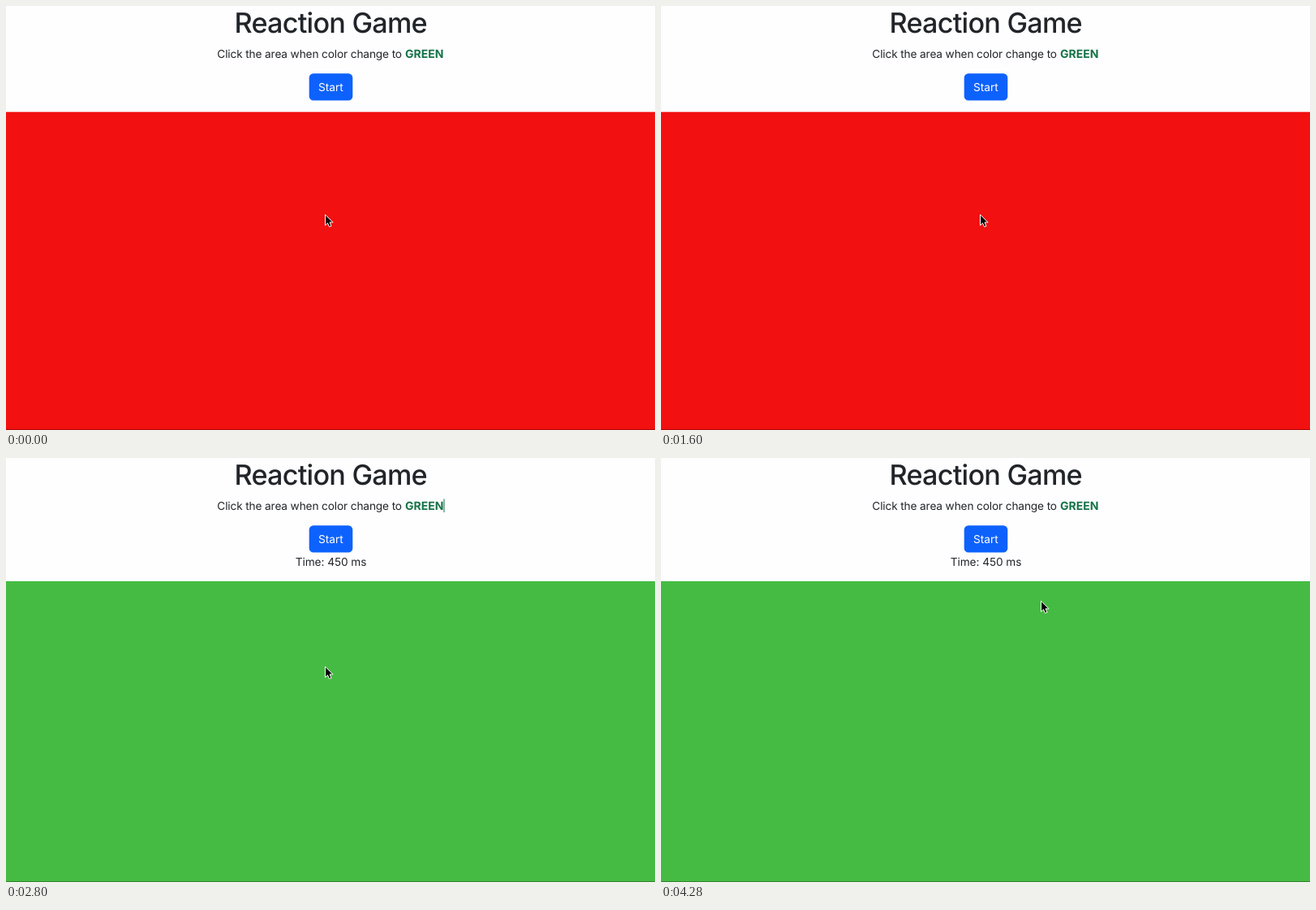
Animation, 800 px wide and 523 px high, one loop 4320 ms. Source, as an HTML page:

```html
<!DOCTYPE html>
<html lang="en">
<head>
<meta charset="utf-8">
<title>Reaction Game</title>
<style>
  html, body { margin: 0; width: 100%; height: 100%; overflow: hidden; background: #fefdff; }
  svg { display: block; width: 800px; height: 523px; }
  text {
    font: 400 13.65px Inter, "Liberation Sans", sans-serif;
    font-optical-sizing: none;
    text-rendering: geometricPrecision;
    fill: #212529;
  }
  .mid { text-anchor: middle; }
  .title { font-size: 34.2px; font-weight: 500; letter-spacing: -.022em; }
  .hint { letter-spacing: -.009em; }
  .go { font-size: 14px; font-weight: 700; fill: #157347; }
  .label { fill: #fff; }
  .time { letter-spacing: -.004em; }

  .area, .result, .caret, .pointer { animation: 4320ms step-end infinite; }
  .area { animation-name: signal; }
  .result { animation-name: reveal; }
  .caret { animation-name: blink; }
  .pointer { animation-name: move; animation-timing-function: linear; }

  @keyframes signal {
    0% { fill: #f21010; }
    55.55%, 100% { fill: #46bb43; }
  }
  @keyframes reveal {
    0% { opacity: 0; }
    64.81%, 100% { opacity: 1; }
  }
  @keyframes blink {
    0%, 75.46%, 98.61%, 100% { opacity: 0; }
    63.88%, 87.03% { opacity: 1; }
  }
  @keyframes move {
    0% { transform: translate(393px, 257px); }
    69.44% { transform: translate(393px, 257px); animation-timing-function: cubic-bezier(.45, 0, .6, .8); }
    78.7% { transform: translate(464px, 178px); animation-timing-function: ease-out; }
    83.33%, 100% { transform: translate(468px, 176px); }
  }
</style>
</head>
<body>
<svg viewBox="0 0 800 523">
  <rect width="800" height="523" fill="#fefdff"/>
  <text class="title mid" x="400.2" y="33">Reaction Game</text>
  <text class="hint" x="260.3" y="64">Click the area when color change to</text>
  <text class="go" x="492" y="64">GREEN</text>
  <rect class="caret" x="539.5" y="50.5" width="1" height="16.5" fill="#157347"/>

  <rect x="373.7" y="83.2" width="53.6" height="33.4" rx="5.2" fill="#0d62fd"/>
  <text class="label mid" x="400.4" y="105.2">Start</text>

  <rect class="area" y="130.7" width="800" height="393"/>
  <g class="result">
    <rect y="130" width="800" height="22" fill="#fefdff"/>
    <text class="time mid" x="400.5" y="132.6">Time: 450 ms</text>
  </g>
  <rect y="522" width="800" height="1" opacity=".3"/>

  <g class="pointer">
    <path d="M.5 .3V13.6L3.5 10.8L5.6 15.4L8 14.4L6 9.9H10.1Z"
          fill="#000" stroke="#fff" stroke-width="1" stroke-linejoin="round"/>
  </g>
</svg>
</body>
</html>
```
